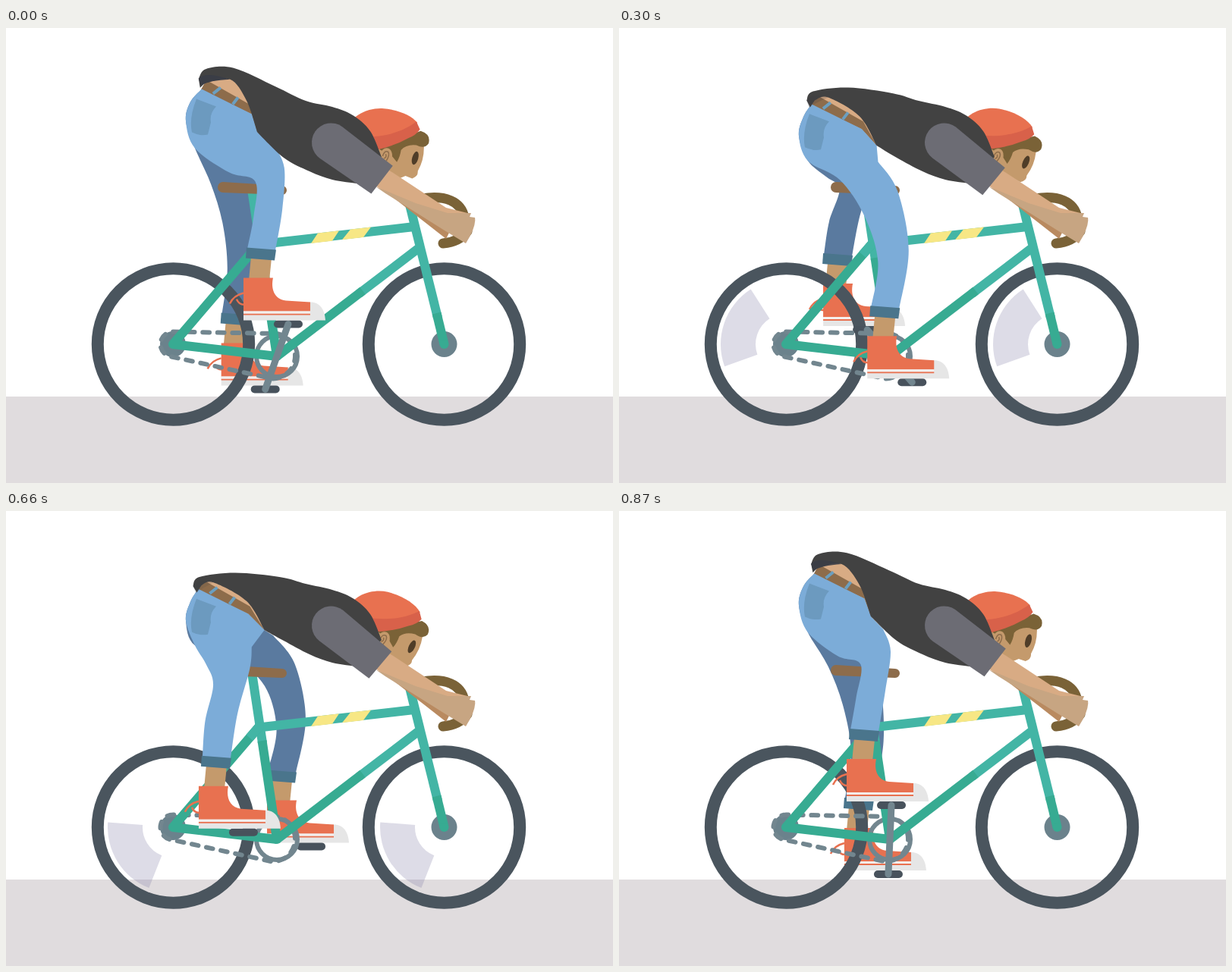
Write an HTML page that moves like this. It is 800 px wide and 600 px high and loops after 900 ms.

```html
<!DOCTYPE html>
<html lang="en">
<head>
<meta charset="utf-8">
<title>Cyclist</title>
<style>
  html, body { margin: 0; width: 100%; height: 100%; overflow: hidden; background: #fff; }
  svg { display: block; width: 100vw; height: 100vh; }
</style>
</head>
<body>
<svg viewBox="0 0 800 600">
  <defs>
    <g id="shoe">
      <path d="M0-36Q-13-33-18-22M-9-28Q-6-20 3-21" fill="none" stroke="#e87150" stroke-width="2.5"/>
      <path d="M0 0V-13L88-24C101-24 107-14 108 0Z" fill="#e6e6e6"/>
      <path d="M0-12V-56H39C36-42 40-28 56-26L88-24V-12Z" fill="#e87150"/>
      <path d="M0-8H88" stroke="#e87150" stroke-width="2"/>
      <path d="M0-10.5H88" stroke="#f4efed" stroke-width="3"/>
    </g>
    <path id="ankle" d="M10-84L37-82L34-52H7Z" fill="#c49a6c"/>
    <path id="cuff" d="M4-96L43-93L41-79L3-82Z" fill="#4a758c"/>
    <path id="pedal" d="M-14 0H14" stroke="#48525c" stroke-width="10" stroke-linecap="round"/>
  </defs>

  <path d="M0 486H800V600H0Z" fill="#e0dcde"/>
  <g fill="#78739f" fill-opacity=".25">
    <path id="glintA"/><path id="glintB"/>
  </g>

  <g id="farFoot"><use href="#ankle" x="-4"/><use href="#shoe"/></g>
  <path id="farLeg" fill="#5a7a9f"/>
  <use id="farCuff" href="#cuff"/>

  <g fill="none" stroke="#4a555e" stroke-width="16">
    <circle cx="220.5" cy="417" r="99.7"/><circle cx="577.5" cy="417" r="99.7"/>
  </g>
  <g fill="#6b828c">
    <circle cx="220" cy="417" r="17"/><circle cx="577.5" cy="417" r="17"/>
  </g>
  <use id="farPedal" href="#pedal"/>
  <g fill="none" stroke="#72868f" stroke-width="6">
    <circle cx="357" cy="433" r="27"/>
    <path id="chain" pathLength="420" stroke-dasharray="9 11" stroke-linecap="round"
      d="M220 400.5L357 403A30 30 0 0 1 351 462.4L216 433A16.5 16.5 0 0 1 220 400.5"/>
  </g>

  <g fill="none" stroke="#43b5a5" stroke-width="12">
    <path d="M324.500 216L338 306"/>
    <path d="M333 285.500L538 262"/>
    <path d="M543 291L465 350.500"/>
    <path d="M532 233L569 382"/>
    <g stroke="#37ab92">
      <path d="M337.500 303L357 433"/>
      <path d="M357 433L220 417L333 285" stroke-linejoin="round"/>
      <path d="M357 433L470 346.500"/>
      <path d="M567.500 376L577.500 417"/>
    </g>
    <path d="M334 284L321 299"/>
  </g>
  <g fill="#37ab92">
    <circle cx="577.5" cy="417" r="6"/><circle cx="357" cy="433" r="6"/>
  </g>
  <circle cx="333.5" cy="285" r="6" fill="#43b5a5"/>
  <path d="M402 284L411 270.500L439 267.300L430 280.800ZM443 279.300L454 265.600L481 262.500L471 276Z" fill="#f7e785"/>
  <path d="M286 203L364 208A6 6 0 0 1 364 220L286 217A7 7 0 0 1 286 203Z" fill="#8d6c4b"/>

  <use id="nearPedal" href="#pedal"/>
  <path id="crank" stroke="#72868f" stroke-width="9" stroke-linecap="round"/>

  <path d="M548 225C578 220 600 228 604 250M608 268Q598 282 576 284" fill="none" stroke="#7a6237" stroke-width="13" stroke-linecap="round"/>
  <path d="M488 206L580 278L588 262L520 205Z" fill="#b98a60"/>

  <g id="head">
    <path d="M488 150L545 138L551 154Q552 172 544 187Q545 194 537 197L528 194L508 203L490 185Z" fill="#c49a6c"/>
    <path d="M488 158L546 134Q560 138 557 150Q552 158 541 153Q528 152 521 160Q520 169 516 176L509 168Z" fill="#7a6237"/>
    <ellipse cx="540" cy="170" rx="4" ry="9" fill="#4f3d28" transform="rotate(14 540 170)"/>
    <ellipse cx="501" cy="170" rx="8.500" ry="12" fill="#c49a6c" transform="rotate(12 501 170)"/>
    <path d="M497 169Q499 161 504 163Q507 167 502 175M499 172Q503 170 501 166" fill="none" stroke="#8d6c4b" stroke-width="1.500"/>
    <path d="M446 142C450 118 474 106 494 106C516 107 533 114 541 123L536 138L488 162Z" fill="#e87150"/>
    <path d="M470 145C502 143 522 136 540 122L545 132Q540 140 530 144Q512 155 488 161Z" fill="#d8614a"/>
  </g>

  <g id="nearFoot"><use href="#ankle"/><use href="#shoe"/></g>
  <path id="skin" fill="#d8ab84"/>
  <path id="belt" fill="#8d6c4b"/>
  <path id="loops" stroke="#6b9fc0" stroke-width="4"/>
  <path id="nearLeg" fill="#7cacd8"/>
  <path id="pocket" d="M251 93L277 103Q268 112 270 124L266 140Q255 142 245 137Q241 118 251 93Z" fill="#6c9abf"/>
  <use id="nearCuff" href="#cuff"/>
  <path id="shirt" fill="#424242"/>
  <path id="lining" fill="#3a3d46"/>

  <path d="M484 206L501 185L580 237L612 245L600 270L578 266Z" fill="#d8ab84"/>
  <path d="M487 209L540 231L582 244L613 244L611 249L618 250Q620 262 606 284L578 267L500 218Z" fill="#c7a582"/>
  <path id="sleeve" d="M443 130L510 181L482 218L414 172A25.500 25.500 0 0 1 443 130Z" fill="#6c6c74"/>
</svg>

<script>
const LOOP = 900;

// [ms, degrees]
const crankKeys = [[0, 19], [180, 98], [300, 139], [420, 193], [540, 238], [750, 314], [870, 362], [900, 379]];
const glintTip = [[55, 63], [90, 94], [180, 166], [300, 237], [380, 270]];
const glintTail = [[90, 63], [180, 95], [300, 159], [405, 270]];

const el = {};
document.querySelectorAll("[id]").forEach(e => el[e.id] = e);
const draw = (id, d) => el[id].setAttribute("d", d);
const place = (id, value) => el[id].setAttribute("transform", value);
const move = (id, p) => place(id, `translate(${p})`);

const cos = deg => Math.cos(deg * Math.PI / 180);
const sin = deg => Math.sin(deg * Math.PI / 180);
const add = (p, x, y) => [p[0] + x, p[1] + y];
const mid = (p, q) => [(p[0] + q[0]) / 2, (p[1] + q[1]) / 2];
const polar = (c, r, deg) => add(c, r * cos(deg), r * sin(deg));
const line = (...pts) => pts.map(p => "L" + p).join("");
const poly = (...pts) => "M" + pts.join("L") + "Z";

// Smooth curve that continues from the first point
function curve(...pts) {
  let d = "";
  for (let i = 0; i < pts.length - 1; i++) {
    const a = pts[i - 1] || pts[i], b = pts[i], c = pts[i + 1], e = pts[i + 2] || c;
    const p = [0, 1].map(k => b[k] + (c[k] - a[k]) / 6);
    const q = [0, 1].map(k => c[k] - (e[k] - b[k]) / 6);
    d += `C${p} ${q} ${c}`;
  }
  return d;
}

function ramp(keys, t) {
  if (t <= keys[0][0]) return keys[0][1];
  for (let i = 1; i < keys.length; i++) {
    const [t0, a] = keys[i - 1], [t1, b] = keys[i];
    if (t < t1) return a + (b - a) * (t - t0) / (t1 - t0);
  }
  return keys[keys.length - 1][1];
}

function sector(cx, from, to) {
  if (to - from < 0.5) return "";
  const at = (r, deg) => polar([cx, 417], r, deg);
  return `M${at(40, from)}L${at(86, from)}A86 86 0 0 1 ${at(86, to)}L${at(40, to)}A40 40 0 0 0 ${at(40, from)}Z`;
}

// How far the hips sink at a crank angle
const sink = a => 16.3 - 16.3 * cos(a - 35);

// Waist points follow the hips
function torso(drop) {
  const sway = (x, y, dx, dy) => [x + dx * drop, y + dy * drop];
  const beltA = sway(258, 80, -0.2, 1);
  return {
    beltA, beltB: add(beltA, 66, 33),
    waist: sway(331, 137, 0.42, 0.88),
    seat: [sway(249, 158, 0, 0.85), sway(237, 122, 0, 1), sway(243, 97, 0, 1)],
    tail: sway(254, 66, -0.33, 1.45),
    back: [sway(264, 53, -0.4, 1.5), sway(300, 52, 0.1, 1.3), sway(355, 77, 0.3, 0.45)],
    hemA: sway(296, 67, -1, 1.2),
    hemB: sway(317, 95, 0, 1.05)
  };
}

// Knee and thigh circle with the crank, the calf hangs between knee and cuff
function leg(a, foot, body) {
  const fold = [338 + 19 * cos(a - 60), 153 + 1.15 * sink(a)];
  const knee = [351 + 32 * cos(a - 80), 205 - 21 * cos(a - 20)];
  const ham = [307 + 38 * cos(a - 75), 230 - 28 * cos(a - 10)];
  const under = [282 + 21 * cos(a - 75), 190 + 0.5 * sink(a)];
  const cuffA = add(foot, 42, -92), cuffB = add(foot, 5, -94);
  const bulge = 5 + 9 * cos(a - 120);
  const shin = add(mid(knee, cuffA), bulge, 0), calf = add(mid(ham, cuffB), bulge, 0);
  return "M" + body.beltA + line(body.beltB, body.waist, fold) + curve(fold, knee, shin, cuffA) +
    line(cuffB) + curve(cuffB, calf, ham, under, ...body.seat, body.beltA) + "Z";
}

function limb(side, a, hub, r, reach, cuffShift, body) {
  const pedal = polar(hub, r, a - 90), foot = add(pedal, -reach, -5), cuff = add(foot, cuffShift, 0);
  move(side + "Pedal", pedal);
  move(side + "Foot", foot);
  move(side + "Cuff", cuff);
  draw(side + "Leg", leg(a, cuff, body));
  return pedal;
}

function render(t) {
  const a = ramp(crankKeys, t), drop = sink(a), body = torso(drop);
  const { beltA, beltB, waist, tail, back, hemA, hemB } = body;

  const near = limb("near", a, [357, 433], 45, 59, 0, body);
  const far = limb("far", a + 180, [357, 433], 46, 58, -4, body);
  draw("crank", `M${near}L${far}`);
  el.crank.style.opacity = Math.abs(cos(a)) > 0.6 ? 1 : 0;
  el.chain.setAttribute("stroke-dashoffset", -t / LOOP * 180);

  const p = t % (LOOP / 2), from = ramp(glintTail, p), to = ramp(glintTip, p);
  draw("glintA", sector(220, from, to));
  draw("glintB", sector(579, from, to));

  move("pocket", [0, drop]);
  draw("skin", poly(add(beltA, 4, -9), add(hemA, 0, -3), add(hemB, 4, -4), waist, beltB));
  draw("belt", poly(add(beltA, -1, 1), add(beltA, 6, -12), add(beltB, 2, -10), waist, beltB));
  draw("loops", `M${add(beltA, 15, 6)}L${add(beltA, 25, -2)}M${add(beltA, 41, 20)}L${add(beltA, 48, 11)}`);

  const hip = add(beltA, 4, -8 + 0.15 * drop), flap = add(beltA, -2, -2 + 0.3 * drop);
  draw("shirt", "M" + tail + curve(tail, ...back, [395, 96], [430, 104], [457, 115], [480, 136], [495, 170]) +
    line([463, 205]) + curve([463, 205], [430, 200], [400, 189], [366, 171], waist) +
    curve(waist, hemB, hemA, hip) + line(flap) + curve(flap, tail) + "Z");
  draw("lining", `M${tail}Q${add(tail, 8, -10)} ${hemA}Q${add(tail, 14, 2)} ${add(tail, 3, 9)}Z`);
  el.lining.style.opacity = Math.max(0, 1 - drop / 26);

  const tilt = 12 * Math.abs(sin(a - 10));
  place("head", `rotate(${tilt} 495 150)`);
  place("sleeve", `rotate(${tilt / 4} 428 151)`);
}

function frame() {
  render(performance.now() % LOOP);
  requestAnimationFrame(frame);
}
frame();
</script>
</body>
</html>
```
